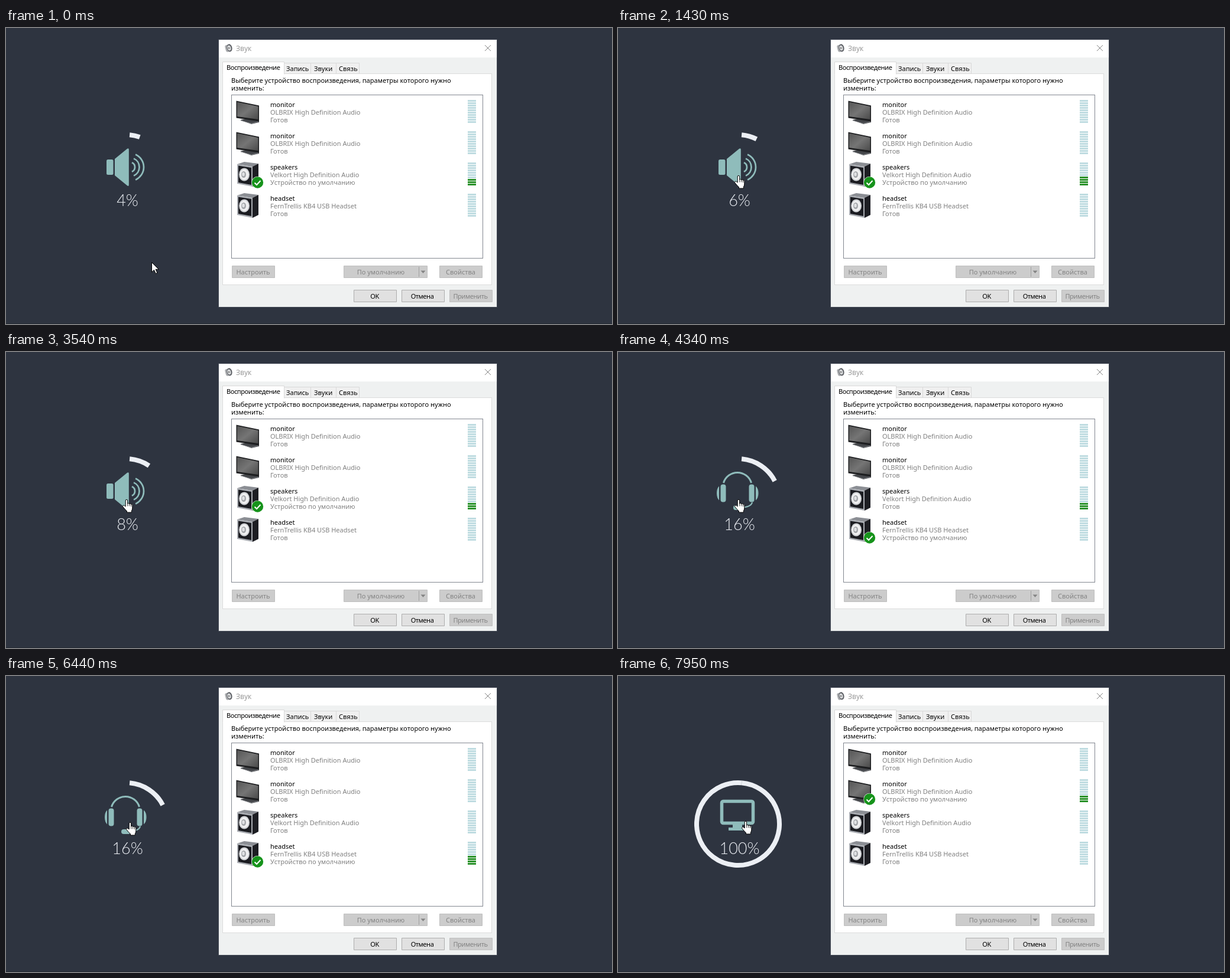
An HTML page that plays this animation: 1025x502 px, repeating every 8 s.

```html
<!DOCTYPE html>
<html lang="ru">
<head>
<meta charset="utf-8">
<title>Звук</title>
<style>
html, body { margin: 0; width: 100%; height: 100%; overflow: hidden; background: #2e3440; }
svg { display: block; width: 1025px; height: 502px; }
text { font: 11px "Noto Sans", "Open Sans", sans-serif; }
.narrow { letter-spacing: -.45px; }
.mid { text-anchor: middle; }
.gray { fill: #808080; }
.off { fill: #838383; }
#level { font: 300 27px Lato, sans-serif; fill: #eceff4; text-anchor: middle; }
.icon { fill: #8fbcbb; }
.icon .line { fill: none; stroke: #8fbcbb; }
</style>
</head>
<body>
<svg viewBox="0 0 1025 502">
  <defs>
    <pattern id="cells" width="14" height="4" patternUnits="userSpaceOnUse">
      <rect width="14" height="3" fill="#bfdce1"/>
    </pattern>
    <pattern id="lit" width="14" height="4" patternUnits="userSpaceOnUse">
      <rect width="14" height="3" fill="#2a922a"/>
      <rect y="3" width="14" height="1" fill="#fff"/>
    </pattern>
    <linearGradient id="screen" x2="1" y2="1">
      <stop stop-color="#565656"/><stop offset=".5" stop-color="#757575"/><stop offset="1" stop-color="#4a4a4a"/>
    </linearGradient>
    <g id="tv">
      <path d="M396 156l14-3 18 4v3l-13 3z" fill="#44464a"/>
      <path d="M397 157l18 5 12-3" fill="none" stroke="#909296" stroke-width=".8"/>
      <path d="M389.500 123.500l38.500 8v27l-38.500-6z" fill="#1d1e20"/>
      <path d="M391 125.500l35.500 7.500v22l-35.500-5z" fill="url(#screen)"/>
    </g>
    <g id="box">
      <path d="M391 125l12-4 24 3-10 5z" fill="#8b8e94"/>
      <path d="M417 129l10-5v34l-10 5z" fill="#1d1e23"/>
      <path d="M391 125l26 4v34l-26-5z" fill="#a9acb2"/>
      <path d="M393 127.500l22 3.500v29l-22-4z" fill="#1b1c21"/>
      <ellipse cx="403" cy="142.500" rx="9" ry="11" fill="#d0d2d5"/>
      <ellipse cx="403" cy="142.500" rx="7.300" ry="9" fill="#f1f1f2"/>
      <ellipse cx="402" cy="142.500" rx="4" ry="5.500" fill="#a3a6aa"/>
      <ellipse cx="401.500" cy="142" rx="2.200" ry="3.200" fill="#e2e3e5"/>
    </g>
    <g id="badge">
      <circle cx="425.500" cy="156" r="10.200" fill="#fff"/>
      <circle cx="425.500" cy="156" r="9.700" fill="#16931b"/>
      <path d="M420.500 156.500l3.500 3.500 6.500-7" fill="none" stroke="#fff" stroke-width="2"/>
    </g>
  </defs>

  <rect width="1025" height="502" fill="#2e3440"/>
  <rect y="501" width="1025" height="1" fill="#242932"/>

  <!-- dialog -->
  <rect x="359.500" y="19.500" width="471" height="454" fill="#eff1f1" stroke="#454b57"/>
  <rect x="360" y="20" width="470" height="30" fill="#fff"/>
  <g transform="rotate(-14 377 34)">
    <rect x="371" y="28" width="9" height="12" rx="3" fill="#a9abae"/>
    <ellipse cx="378" cy="34" rx="4.500" ry="6.500" fill="#5b5e63"/>
    <ellipse cx="377.500" cy="34" rx="3" ry="4.500" fill="#d9dbdd"/>
    <circle cx="377" cy="34" r="1.500" fill="#888"/>
  </g>
  <text x="389" y="39" fill="#999" style="font-size:12px">Звук</text>
  <path d="M810 29l10 10m0-10l-10 10" stroke="#858585"/>
  <rect x="366.500" y="77.500" width="455" height="358" fill="#fff" stroke="#dcdcdc"/>
  <g fill="#f0f0f0" stroke="#d9d9d9">
    <path d="M470.500 77.500v-18h45v18zM515.500 77.500v-18h43v18zM558.500 77.500v-18h39v18z"/>
    <path d="M366.500 78.500v-21h104v21" fill="#fff"/>
  </g>
  <text x="373" y="71" class="narrow">Воспроизведение</text>
  <text x="474" y="73">Запись</text>
  <text x="521" y="73">Звуки</text>
  <text x="563" y="73">Связь</text>
  <text x="381" y="93">Выберите устройство воспроизведения, параметры которого нужно</text>
  <text x="381" y="106">изменить:</text>
  <rect x="381.500" y="113.500" width="425" height="277" fill="#fff" stroke="#828790"/>
  <g id="rows"></g>

  <g fill="#ccc" stroke="#bfbfbf">
    <path d="M382.500 403.500h72v20h-72zM571.500 403.500h141v20h-141zM733.500 403.500h72v20h-72zM750.500 444.500h72v20h-72z"/>
    <path d="M698.500 405v17" stroke="#a0a0a0"/>
    <path d="M588.500 444.500h72v20h-72zM669.500 444.500h72v20h-72z" fill="#e1e1e1" stroke="#adadad"/>
  </g>
  <path d="M701.500 411.500h8l-4 4.500z" fill="#838383"/>
  <g class="mid">
    <g class="off">
      <text x="418" y="418">Настроить</text>
      <text x="634" y="418">По умолчанию</text>
      <text x="769" y="418">Свойства</text>
      <text x="785.500" y="459" class="narrow">Применить</text>
    </g>
    <g class="narrow">
      <text x="623.500" y="459">OK</text>
      <text x="704" y="459">Отмена</text>
    </g>
  </g>

  <!-- volume widget -->
  <path id="arc" fill="none" stroke="#eceff4" stroke-width="8"/>
  <g class="icon" id="speakers">
    <rect x="170" y="223" width="11.500" height="26" rx="2.500"/>
    <path d="M184 222L205 204.800q2.800-1.800 2.800 1.200v60q0 3-2.800 1.200L184 250z"/>
    <g id="waves" class="line" stroke-width="2.700"></g>
  </g>
  <g class="icon" id="headset">
    <path class="line" stroke-width="3" d="M178.500 222A24.500 24.500 0 0 1 225.500 222"/>
    <rect x="173.500" y="224.500" width="9" height="30" rx="4"/>
    <rect x="221.500" y="224.500" width="9" height="30" rx="4"/>
    <path d="M171 227.500v24q-4-4-4-12t4-12zM233 227.500v24q4.500-4 4.500-12t-4.500-12z"/>
    <path class="line" stroke-width="2.200" d="M227 255q-2 8-19 9"/>
    <rect x="195" y="260" width="16" height="8" rx="4"/>
  </g>
  <g class="icon" id="monitor">
    <rect class="line" x="175.500" y="212.500" width="53" height="37" rx="2.500" stroke-width="5.500"/>
    <path d="M194 252h16v5h6v5h-29v-5h7z"/>
  </g>
  <text id="level" x="205.500" y="302"></text>

  <g id="cursor" stroke-linejoin="round">
    <path id="arrow" d="M.5.500V17l3.900-3.700 2.900 6.200 2.600-1.200-2.800-6H12.300z" fill="#fff" stroke="#000"/>
    <g id="hand" transform="translate(-7)">
      <path d="M5.200 12V2a1.700 1.700 0 0 1 3.400 0V7.500a1.600 1.600 0 0 1 3.100.5a1.500 1.500 0 0 1 2.800.7a1.300 1.300 0 0 1 2.300 1.100V15q0 2-1.500 4.500V22H7.500V20Q4 16.500 1 12.800A1.600 1.600 0 0 1 3.400 10.600z" fill="#fff" stroke="#000"/>
      <path d="M8.700 7.500v4M11.700 8v3.500M14.500 9v3" stroke="#000" stroke-width=".8"/>
    </g>
  </g>
</svg>
<script>
const LOOP = 8000;
const BEAT = 165;         // the meters move once per beat
const CURSOR_STEP = 45;
const DIALOG_LAG = 50;    // the dialog follows the widget,
const SOUND_LAG = 190;    // and the sound follows the dialog
const $ = id => document.getElementById(id);

const devices = [
  ['monitor', 'OLBRIX High Definition Audio', 'tv'],
  ['monitor', 'OLBRIX High Definition Audio', 'tv'],
  ['speakers', 'Velkort High Definition Audio', 'box'],
  ['headset', 'FernTrellis KB4 USB Headset', 'box']
];

const scenes = [
  { start: 0, device: 2, volume: 4 },
  { start: 4290, device: 3, volume: 16 },
  { start: 6680, device: 1, volume: 100 }
];

// Wheel turns over the speakers
const turns = [
  { from: 1380, to: 1610, volume: 12 },
  { from: 2070, to: 2240, volume: 22 },
  { from: 2780, to: 3260, volume: 8 }
];

const moves = [
  { from: 50, to: 640, x: 203, y: 252 },
  { from: 1020, to: 1050, x: 204, y: 250 },
  { from: 5590, to: 5780, x: 206, y: 250 },
  { from: 6390, to: 6600, x: 216, y: 246 }
];

$('rows').innerHTML = devices.map(([name, driver, icon], i) => `
  <g transform="translate(0 ${i * 53})">
    <use href="#${icon}"/>
    <use href="#badge" id="badge${i}"/>
    <text x="447" y="134">${name}</text>
    <text x="447" y="147" class="gray">${driver}</text>
    <text x="447" y="160" class="gray" id="status${i}"></text>
    <g transform="translate(781 122)">
      <rect width="14" height="40" fill="url(#cells)"/>
      <rect width="14" fill="url(#lit)" id="meter${i}"/>
    </g>
  </g>`).join('');

$('waves').innerHTML = [8.5, 16, 23.5].map(r =>
  `<path d="${arc(209.5, 236, r, 24, 156)}"/>`).join('');

const clamp = k => Math.max(0, Math.min(1, k));
const progress = ({ from, to }, t) => clamp((t - from) / (to - from));
const sceneAt = t => scenes.filter(s => s.start <= Math.max(0, t)).pop();

// Angles in degrees, clockwise from the top
function arc(cx, cy, r, start, end) {
  const point = deg => {
    const a = deg * Math.PI / 180;
    return `${cx + r * Math.sin(a)} ${cy - r * Math.cos(a)}`;
  };
  return `M${point(start)}A${r} ${r} 0 ${+(end - start > 180)} 1 ${point(end)}`;
}

function volumeAt(t) {
  const scene = sceneAt(t);
  if (scene !== scenes[0]) return scene.volume;
  return turns.reduce((v, turn) =>
    v + 2 * Math.round((turn.volume - v) / 2 * progress(turn, t)), scene.volume);
}

function barsAt(t) {
  const rhythm = '3432433';
  return +rhythm[Math.floor(t / BEAT) % rhythm.length];
}

function cursorAt(t) {
  let x = 246, y = 397;
  for (const move of moves) {
    if (t < move.from) break;
    const steps = Math.floor((t - move.from) / CURSOR_STEP) + 1;
    const k = progress(move, move.from + steps * CURSOR_STEP);
    const ease = k * k * (3 - 2 * k);
    x += (move.x - x) * ease;
    y += (move.y - y) * ease;
  }
  return [Math.round(x), Math.round(y)];
}

const show = (id, on) => $(id).setAttribute('visibility', on ? 'visible' : 'hidden');

function draw(now) {
  const t = now % LOOP;
  const level = volumeAt(t);
  const icon = devices[sceneAt(t).device][0];
  const chosen = sceneAt(t - DIALOG_LAG).device;
  const playing = sceneAt(t - SOUND_LAG).device;

  $('arc').setAttribute('d', arc(203, 251, 70, 5, 5 + Math.min(359.9, level * 3.6)));
  $('level').textContent = level + '%';
  for (const id of ['speakers', 'headset', 'monitor']) show(id, id === icon);

  devices.forEach((_, i) => {
    const height = i === playing ? barsAt(t) * 4 : 0;
    show('badge' + i, i === chosen);
    $('status' + i).textContent = i === chosen ? 'Устройство по умолчанию' : 'Готов';
    $('meter' + i).setAttribute('y', 40 - height);
    $('meter' + i).setAttribute('height', height);
  });

  const [x, y] = cursorAt(t);
  const hover = Math.hypot(x - 203, y - 251) < 74;
  $('cursor').setAttribute('transform', `translate(${x} ${y})`);
  show('hand', hover);
  show('arrow', !hover);
  requestAnimationFrame(draw);
}
draw(performance.now());
</script>
</body>
</html>
```
